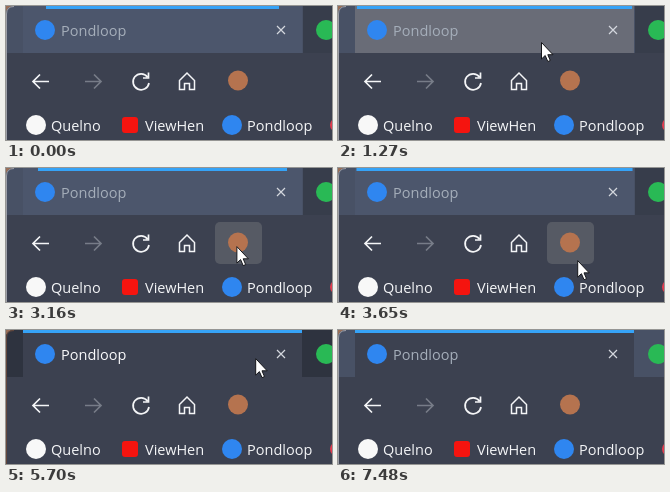
Write an HTML page with a canvas that moves like this. It is 326x134 px and loops after 7550 ms.

```html
<!DOCTYPE html>
<html lang="en">
<head>
<meta charset="utf-8">
<title>Tab hover</title>
<style>
html, body { margin: 0; width: 100%; height: 100%; overflow: hidden; background: #3c4150; }
canvas { display: block; }
</style>
</head>
<body>
<canvas id="stage" width="326" height="134"></canvas>
<script>
const ctx = document.getElementById('stage').getContext('2d');
const LOOP = 7550;
const SELECT = 4690, BLUR = 6660, DIM = 7480;
const FONT = '14.5px "Open Sans", "Noto Sans", sans-serif';
const BLUE = '#2f86f0', WHITE = '#f4f5f7';
const LIT = [72, 81, 101], DARK = [46, 51, 63], BAR = [60, 65, 80];

const ramp = (t, start, length) => Math.min(1, Math.max(0, (t - start) / length));
const pulse = (t, start, end) => ramp(t, start, 140) - ramp(t, end, 140);
const lerp = (a, b, k) => a + (b - a) * k;
const mix = (a, b, k) => `rgb(${a.map((v, i) => Math.round(lerp(v, b[i], k)))})`;

function box(x, y, w, h, color, radius = 0) {
  ctx.fillStyle = color;
  ctx.beginPath();
  ctx.roundRect(x, y, w, h, radius);
  ctx.fill();
}

function dot(x, y, r, color) {
  ctx.fillStyle = color;
  ctx.beginPath();
  ctx.arc(x, y, r, 0, 7);
  ctx.fill();
}

function line(d, color, width = 1.7) {
  ctx.strokeStyle = color;
  ctx.lineWidth = width;
  ctx.stroke(new Path2D(d));
}

function label(text, x, y, color) {
  ctx.fillStyle = color;
  ctx.fillText(text, x, y);
}

// Arrow with its tip at x; dir is the side its tail lies on
function arrow(x, dir, color) {
  line(`M${x + 16 * dir} 75.5H${x}M${x + 7 * dir} 68.5L${x} 75.5l${7 * dir} 7`, color);
}

function drawTabs(t) {
  const active = ramp(t, SELECT, 380);
  const dimmed = t >= DIM;
  const hover = pulse(t, 1130, 1830) + ramp(t, 4380, 140) * (1 - active);

  box(0, 0, 326, 47, mix(LIT, DARK, dimmed ? 0 : active));
  box(17, 0, 279, 47, mix([76, 86, 108], BAR, active));
  box(17, 0, 279, 47, `rgba(105,108,119,${hover})`);
  if (!dimmed) box(297, 0, 29, 47, mix([55, 61, 75], DARK, active));

  // The accent breathes until the tab is selected
  const wave = t < 660 ? 1 : 0.5 + 0.5 * Math.cos((t - 2530) / 790 * 2 * Math.PI);
  const inset = 23 * wave * (1 - active);
  box(17 + inset, 0, 279 - 2 * inset, 3, '#36a3f7');

  const bright = active - ramp(t, BLUR, 640);
  dot(39, 24, 10, BLUE);
  label('Pondloop', 55, 30, mix([165, 174, 186], [250, 250, 252], bright));
  line('M271 20l8 8m0-8l-8 8', '#d4d7de', 1.2);
  dot(320, 24, 10, '#29b955');
}

function drawToolbar(t) {
  box(0, 47, 326, 87, mix(BAR, BAR, 0));
  box(209, 54, 47, 42, `rgba(86,90,100,${pulse(t, 2150, 3820)})`, 5);

  arrow(27, 1, WHITE);
  arrow(95, -1, '#777c88');
  line('M141.5 71A8 8 0 1 0 143 77M142.5 66.5v5.5h-5.5', WHITE);
  line('M173.5 74.5L181 67l7.5 7.5V83.500h-5v-6h-5v6h-5Z', WHITE, 1.5);
  dot(232, 74.5, 10, '#b5734f');

  dot(30, 119, 10, '#f8f8f8');
  label('Quelno', 45, 125, WHITE);
  box(116, 111, 16, 16, '#f5140f', 3);
  label('ViewHen', 139, 125, WHITE);
  dot(226, 119, 10, BLUE);
  label('Pondloop', 241, 125, WHITE);
  dot(331, 119, 7, '#e23b4e');
}

function drawEdge(t) {
  const focus = pulse(t, SELECT, DIM - 140);
  ctx.fillStyle = '#9a6f58';
  ctx.fill(new Path2D('M0 0H8Q0 0 0 8Z'));
  line('M.5 134V8Q.5 .5 8 .5', mix([158, 160, 168], [101, 72, 60], focus), 1);
}

// Each move: start, end, x, y
const MOVES = [
  [660, 1270, 203, 36],
  [1620, 2530, 219, 60],
  [2530, 3750, 241, 95],
  [3850, 4650, 236, 28],
  [5630, 5700, 249, 28],
  [5700, 6130, 330, 73],
  [6180, 6250, 313, 73],
  [6250, 6700, 330, 136]
];

function pointerAt(t) {
  let x = 301, y = 118;
  for (const [start, end, toX, toY] of MOVES) {
    const k = ramp(t, start, end - start);
    x = lerp(x, toX, k);
    y = lerp(y, toY, k);
  }
  return [x, y];
}

function drawPointer(t) {
  if (t < MOVES[0][0]) return;
  ctx.save();
  ctx.translate(...pointerAt(t));
  const shape = new Path2D('M.5 .5V17L4.200 13.500 6.800 19.500 9.300 18.500 6.800 12.700H12Z');
  ctx.fillStyle = '#fff';
  ctx.fill(shape);
  ctx.strokeStyle = '#15161a';
  ctx.lineWidth = 1;
  ctx.stroke(shape);
  ctx.restore();
}

const begin = performance.now();

function frame() {
  const t = (performance.now() - begin) % LOOP;
  ctx.font = FONT;
  for (const draw of [drawTabs, drawToolbar, drawEdge, drawPointer]) draw(t);
  requestAnimationFrame(frame);
}
frame();
</script>
</body>
</html>
```
